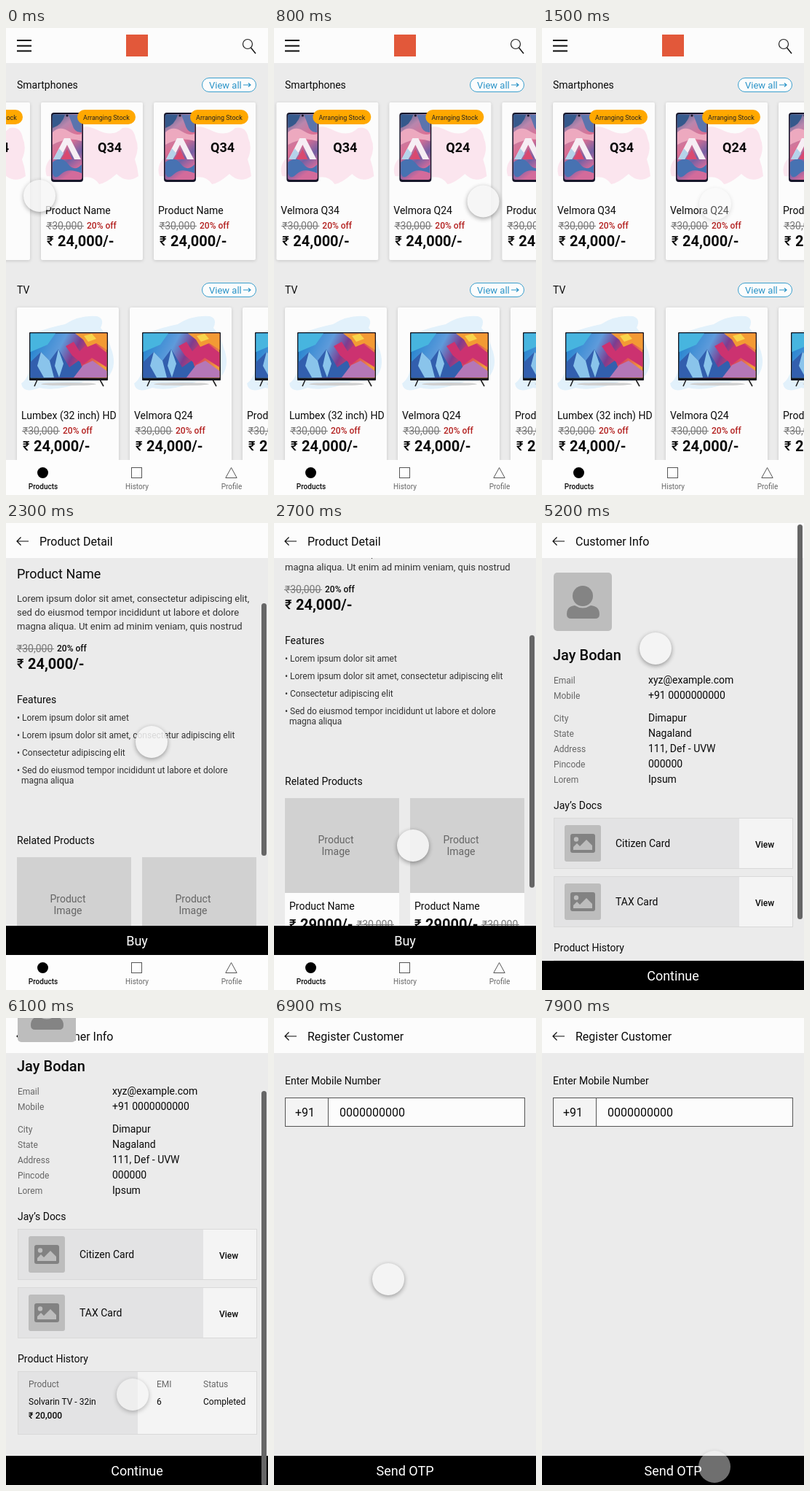
An HTML page for the animation above (8000 ms loop, 360x640 px).

```html
<!DOCTYPE html>
<html lang="en">
<head>
<meta charset="utf-8">
<title>Shop app walkthrough</title>
<style>
html, body { margin: 0; width: 100%; height: 100%; overflow: hidden; background: #ebebeb; }
svg { display: block; width: 360px; height: 640px; font-family: Roboto, "Open Sans", sans-serif; }
.card { filter: drop-shadow(0 1px 2px rgba(0,0,0,.16)); }
#touch { filter: drop-shadow(0 2px 3px rgba(0,0,0,.42)); }
</style>
</head>
<body>
<svg id="stage" viewBox="0 0 360 640" xmlns="http://www.w3.org/2000/svg"></svg>
<script>
const INK = '#0a0a0a', GREY = '#666', WHITE = '#fcfcfc', PAGE = '#ebebeb';
const PERSON = 'Jay Bodan', PHONE = '0000000000';

// y is the middle of the capitals
function text(x, y, str, size, fill = INK, weight = 400, anchor = 'start') {
  return `<text x="${x}" y="${y + size * .355}" font-size="${size}" fill="${fill}" font-weight="${weight}" text-anchor="${anchor}">${str}</text>`;
}
function rect(x, y, w, h, fill, more = '') {
  return `<rect x="${x}" y="${y}" width="${w}" height="${h}" fill="${fill}" ${more}/>`;
}
function line(d, width = 1, stroke = INK) {
  return `<path d="${d}" fill="none" stroke="${stroke}" stroke-width="${width}"/>`;
}
function group(x, y, body, id = '') {
  return `<g ${id && `id="${id}"`} transform="translate(${x} ${y})">${body}</g>`;
}
const range = (n, fn) => Array.from({ length: n }, (_, i) => fn(i)).join('');

const defs = `<defs>
  <linearGradient id="wall" x1="0" y1="0" x2=".35" y2="1">
    <stop offset="0" stop-color="#41618f"/><stop offset=".28" stop-color="#b986ad"/>
    <stop offset=".55" stop-color="#dc6f93"/><stop offset=".8" stop-color="#7560a4"/><stop offset="1" stop-color="#d36b9b"/>
  </linearGradient>
  <linearGradient id="screen" x1="0" y1=".3" x2="1" y2=".6">
    <stop offset="0" stop-color="#2584cf"/><stop offset=".36" stop-color="#5e9bdb"/>
    <stop offset=".56" stop-color="#7d3c8f"/><stop offset=".75" stop-color="#d8415f"/><stop offset="1" stop-color="#f09a3a"/>
  </linearGradient>
  <g id="phone">
    <path d="M48 40Q58 28 76 37Q99 49 112 35Q127 32 130 49Q136 62 129 78Q133 89 134 101Q118 112 104 98Q89 111 80 112Q71 98 52 104L8 101Q3 87 14 76Z" fill="#fbe5ee"/>
    ${rect(14, 14, 44, 95, '#17162a', 'rx="4"')}
    ${rect(15.5, 16, 41, 90, 'url(#wall)', 'rx="3"')}
    <path d="M16 17H33Q29 31 16 35Z" fill="#35598c"/>
    <path d="M38 17H56V41Q46 42 43 30Z" fill="#5b74ad"/>
    <path d="M16 41Q26 31 39 40Q49 46 56 43V53Q37 46 16 58Z" fill="#eda9bf"/>
    <path d="M16 82Q28 72 37 84T56 85V97Q37 89 28 98T16 97Z" fill="#4772b2"/>
    <path d="M17 78L32 49H40L55 78H46L36 58L26 78Z" fill="#f6eef4"/>
    <path d="M28 78L36 64L43 78Z" fill="#d94970"/>
    <path d="M17 78L25 63L31 70L26 78Z" fill="#b5d3ea"/>
    <circle cx="36" cy="18" r="1.6" fill="#17162a"/>
  </g>
  <g id="tv">
    <path d="M21 36Q45 27 66 23Q86 10 110 12Q121 15 115 28Q125 39 129 55Q138 78 127 93Q114 104 94 101Q54 116 31 110Q8 119 6 104Q18 96 18 74Z" fill="#e2f1fb"/>
    ${line('M28 99L24 108M114 99L119 108', 1.6, '#222')}
    <ellipse cx="71" cy="105" rx="38" ry="2" fill="#cfcfcf"/>
    ${rect(17, 34, 108, 66, '#15161d', 'rx="1"')}
    ${rect(18.5, 35.5, 105, 61, 'url(#screen)')}
    <path d="M18.5 35.5H53L42 51L18.5 61Z" fill="#47b5df"/>
    <path d="M18.5 96V75L33 61L45 73L57 57L72 82L86 72L94 96Z" fill="#325fae"/>
    <path d="M33 61L45 73L51 96H37L28 80ZM57 57L64 77L58 96L52 80Z" fill="#8ac4eb"/>
    <path d="M67 53L78 47L86 60L101 45L123.5 62V82L103 69L91 78L76 66Z" fill="#cc3270"/>
    <path d="M80 35.5H123.5V58L109 49L97 54L91 44Z" fill="#f39a34"/>
    <path d="M92 39L103 36L109 43L98 47Z" fill="#f8d44a"/>
    <path d="M78 96L91 79L104 73L123.5 87V96Z" fill="#b477b7"/>
  </g>
  <g id="person">
    ${rect(0, 0, 80, 80, '#bdbdbd', 'rx="5"')}
    <circle cx="40" cy="32" r="14" fill="#848484"/>
    <path d="M18 57Q18 46 29 45Q40 52 51 45Q63 46 63 57Q63 63 57 63H24Q18 63 18 57Z" fill="#848484"/>
  </g>
  <g id="picture">
    ${rect(0, 0, 50, 50, '#bdbdbd', 'rx="3"')}
    ${rect(8, 12, 34, 26, '#828282', 'rx="3"')}
    <circle cx="16" cy="19.5" r="3.2" fill="#bdbdbd"/>
    <path d="M12 34V30L17 25L21 29L30 20L38 28V34Z" fill="#bdbdbd"/>
  </g>
</defs>`;

const was = (x, y) => text(x, y, '₹30,000', 14, '#777') + line(`M${x - 1} ${y + .5}h52`, 1.2, '#777');
const price = (x, y, n) => text(x, y, '₹', 18, INK, 500) + text(x + 15, y, n + '/-', 20, INK, 700);

function productCard(i, art, name, label) {
  const chip = label
    ? rect(50, 10, 80, 20, '#ffa800', 'rx="10"') + text(90, 20.5, 'Arranging Stock', 9, '#222', 400, 'middle') +
      text(78, 62, label, 18, INK, 700)
    : '';
  return group(155 * i, 0,
    rect(0, 0, 140, 216, WHITE, 'rx="2" class="card"') + `<use href="#${art}"/>` + chip +
    text(6, 148, name, 14) + was(8, 169) + text(63, 169, '20% off', 12, '#b3201f', 500) + price(8, 189.5, '24,000'));
}
function shelf(y, title) {
  return text(15, y, title, 14) +
    rect(269.5, y - 9.5, 74, 19, WHITE, 'rx="9.5" stroke="#3a9fce"') +
    text(279, y, 'View all', 13, '#2b94c8') +
    line(`M326 ${y}h10m-3 -2.5l3 2.5l-3 2.5`, 1.2, '#2b94c8');
}
const bar = rect(0, 0, 360, 48, WHITE);
const titled = s => bar + line('M31 25H15.5m5 -5.5l-5.5 5.5l5.5 5.5', 1.2) + text(46, 25, s, 16);
const button = (y, s) => rect(0, y, 360, 40, '#000') + text(180, y + 21, s, 18, '#fff', 400, 'middle');
const nav = rect(0, 592, 360, 48, '#fdfdfd') +
  '<circle cx="50.5" cy="609.5" r="7.5" fill="#000"/>' +
  rect(172.5, 602.5, 14, 14, 'none', 'stroke="#555"') +
  line('M309.5 602.5l7.7 14h-15.4Z', 1, '#555') +
  text(51, 628, 'Products', 10, INK, 500, 'middle') +
  text(180, 628, 'History', 10, GREY, 400, 'middle') +
  text(310, 628, 'Profile', 10, GREY, 400, 'middle');

const home = shelf(78, 'Smartphones') +
  group(15, 102,
    productCard(0, 'phone', 'Velmora Q34', 'Q34') + productCard(1, 'phone', 'Velmora Q24', 'Q24') +
    productCard(2, 'phone', 'Product Name', 'Q34') + productCard(3, 'phone', 'Product Name', 'Q34'), 'row') +
  shelf(359, 'TV') +
  group(15, 383,
    productCard(0, 'tv', 'Lumbex (32 inch) HD') + productCard(1, 'tv', 'Velmora Q24') + productCard(2, 'tv', 'Product Name')) +
  bar + line('M15 17H35M15 24.5H35M15 31.5H35', 2) +
  rect(165, 9, 30, 30, '#e2583a') +
  '<circle cx="332" cy="22" r="6.5" fill="none" stroke="#222" stroke-width="1.2"/>' + line('M336.5 27L343 35', 1.3) +
  nav;

const about = ['Lorem ipsum dolor sit amet, consectetur adipiscing elit,',
  'sed do eiusmod tempor incididunt ut labore et dolore',
  'magna aliqua. Ut enim ad minim veniam, quis nostrud'];
const features = ['Lorem ipsum dolor sit amet', 'Lorem ipsum dolor sit amet, consectetur adipiscing elit',
  'Consectetur adipiscing elit', 'Sed do eiusmod tempor incididunt ut labore et dolore'];

function related(i) {
  return group(15 + 172 * (i % 2), 658 + 210 * (i >> 1),
    rect(0, 0, 157, 195, WHITE) + rect(0, 0, 157, 130, '#d1d1d1') +
    text(70, 57, 'Product', 14, GREY, 400, 'middle') + text(70, 73, 'Image', 14, GREY, 400, 'middle') +
    text(6, 148, 'Product Name', 14) + price(6, 173, '29000') + was(99, 173));
}
const detail = group(0, 0,
  rect(15, 63, 330, 180, '#d1d1d1') +
  text(180, 145, 'Product', 14, GREY, 400, 'middle') + text(180, 161, 'Image', 14, GREY, 400, 'middle') +
  text(15, 270, 'Product Name', 18) +
  range(3, i => text(15, 303 + 19 * i, about[i], 13, '#333')) +
  was(15, 372) + text(70, 372, '20% off', 12, INK, 500) + price(15, 392.5, '24,000') +
  text(15, 442, 'Features', 14) +
  range(4, i => text(15, 467 + 24 * i, '•', 12, '#333') + text(22, 467 + 24 * i, features[i], 12, '#333')) +
  text(21, 553, 'magna aliqua', 12, '#333') +
  text(15, 635, 'Related Products', 14) + range(4, related), 'detailBody') +
  titled('Product Detail') + button(552, 'Buy') + nav;

const select = titled('Select Customer') +
  rect(15.5, 63.5, 329, 39, '#f3f3f3', 'stroke="#555"') + text(30, 83.5, 'Search by Name or Number…', 14, '#777') +
  range(8, i => group(15, 123 + 70 * i,
    rect(0, 0, 330, 60, WHITE) +
    '<use href="#person" transform="translate(10 9) scale(.5)"/>' +
    text(65, 20, PERSON, 16) + text(65, 41, '+91 ' + PHONE, 12, GREY) +
    text(315, 31, 'Kohima, Nagaland', 10, GREY, 400, 'end'))) +
  '<circle cx="325" cy="605" r="20" fill="#000"/>' + line('M316 605H334M325 596V614', 2, '#fff');

const facts = [[216, 'Email', 'xyz@example.com'], [237, 'Mobile', '+91 ' + PHONE], [268, 'City', 'Dimapur'],
  [289, 'State', 'Nagaland'], [310, 'Address', '111, Def - UVW'], [331, 'Pincode', '000000'], [352, 'Lorem', 'Ipsum']];
const box = (y, h, split) => rect(16, y, 329, h, '#f4f4f4') + rect(16, y, split - 16, h, '#e3e3e4') +
  rect(16.5, y + .5, 328, h - 1, 'none', 'stroke="#d9d9d9"');
const doc = (y, name) => box(y, 70, 271) + `<use href="#picture" x="31" y="${y + 10}"/>` +
  text(101, y + 35.5, name, 14) + text(293, y + 36.5, 'View', 12, INK, 500);

const info = group(0, 0,
  text(15, 180.5, PERSON, 20, INK, 500) +
  facts.map(([y, k, v]) => text(16, y, k, 12, GREY) + text(146, y - .5, v, 14)).join('') +
  text(16, 387.5, PERSON.split(' ')[0] + '’s Docs', 14) +
  doc(404, 'Citizen Card') + doc(484, 'TAX Card') +
  text(16, 582.5, 'Product History', 14) + box(599, 87, 181) +
  text(31, 617, 'Product', 12, GREY) + text(207, 617, 'EMI', 12, GREY) + text(271, 617, 'Status', 12, GREY) +
  text(31, 641, 'Solvarin TV - 32in', 12) + text(207, 641, '6', 12) + text(271, 641, 'Completed', 12) +
  text(31, 660, '₹ 20,000', 12, INK, 500), 'infoBody') +
  titled('Customer Info') + group(0, 0, '<use href="#person" x="16" y="68"/>', 'face') +
  button(600, 'Continue');

const register = titled('Register Customer') + text(15, 86.5, 'Enter Mobile Number', 14) +
  rect(15.5, 109.5, 329, 39, WHITE, 'stroke="#555"') + rect(16, 110, 58, 38, '#f4f4f4') + line('M74.5 110V148', 1, '#555') +
  text(29, 129.5, '+91', 16) + text(90, 129.5, PHONE, 16) + button(600, 'Send OTP');

const screens = { home, detail, select, info, register };
const stage = document.getElementById('stage');
stage.innerHTML = defs + rect(0, 0, 360, 640, PAGE) +
  Object.entries(screens).map(([id, body]) => `<g id="${id}">${body}</g>`).join('') +
  rect(351, 2, 7, 100, '#666', 'rx="3.5" id="thumb"') +
  '<circle id="touch" r="22" fill="#f6f6f6"/>';
const $ = id => document.getElementById(id);

// Tracks: [time, value, ...]
const cuts = [['home', 0], ['detail', 1600], ['select', 3800], ['info', 4900], ['register', 6700]];
const swipe = [[0, 277], [200, 275], [300, 275], [600, 45], [900, 0]];
const detailScroll = [[1900, 0], [2300, 200], [2600, 243], [2700, 281], [2950, 463], [3200, 503]];
const infoScroll = [[5500, 0], [5950, 112], [6100, 115]];
const touch = [
  [0, 46, 230, .75], [300, 60, 231, .9], [600, 290, 235, .85], [1000, 285, 240, .85], [1300, 238, 241, .9],
  [1500, 238, 241, .3], [1900, 205, 500, .85], [2300, 200, 300, .85], [2600, 191, 480, .85], [2700, 191, 442, .88],
  [2950, 190, 260, .85], [3500, 188, 570, .85], [3800, 205, 581, .92], [4200, 165, 460, .9], [4500, 123, 280, .9],
  [4800, 146, 182, .85], [5200, 156, 172, .88], [5450, 170, 440, .85], [5900, 172, 320, .85], [6100, 174, 516, .6],
  [6600, 181, 614, .7], [7100, 144, 219, .9], [7300, 144, 219, .9], [7600, 236, 440, .9], [7800, 243, 600, .8], [7900, 237, 615, .45]];

function at(track, t) {
  const n = track.findIndex(k => k[0] > t);
  if (n === 0) return track[0].slice(1);
  if (n < 0) return track[track.length - 1].slice(1);
  const a = track[n - 1], b = track[n];
  const p = (t - a[0]) / (b[0] - a[0]), e = p * p * (3 - 2 * p);
  return a.slice(1).map((v, i) => v + (b[i + 1] - v) * e);
}
const move = (id, x, y) => $(id).setAttribute('transform', `translate(${x} ${y})`);

function draw(t) {
  const now = cuts.filter(c => c[1] <= t).pop()[0];
  for (const id in screens) $(id).style.display = id === now ? '' : 'none';

  const [sx] = at(swipe, t), [dy] = at(detailScroll, t), [iy] = at(infoScroll, t);
  move('row', 15 - sx, 102);
  move('detailBody', 0, -dy);
  move('infoBody', 0, -iy);
  move('face', 0, -iy);

  const thumb = { detail: [2 + dy * .54, 346], select: [2, 552], info: [2 + iy * .852, 541] }[now];
  $('thumb').style.display = thumb ? '' : 'none';
  if (thumb) {
    $('thumb').setAttribute('y', thumb[0]);
    $('thumb').setAttribute('height', thumb[1]);
  }
  const [x, y, alpha] = at(touch, t);
  move('touch', x, y);
  $('touch').setAttribute('opacity', alpha);
}

const start = performance.now(), STEP = 100, LOOP = 8000;
function tick() {
  const t = (performance.now() - start) % LOOP;
  draw(Math.floor(t / STEP) * STEP);
  requestAnimationFrame(tick);
}
tick();
</script>
</body>
</html>
```
